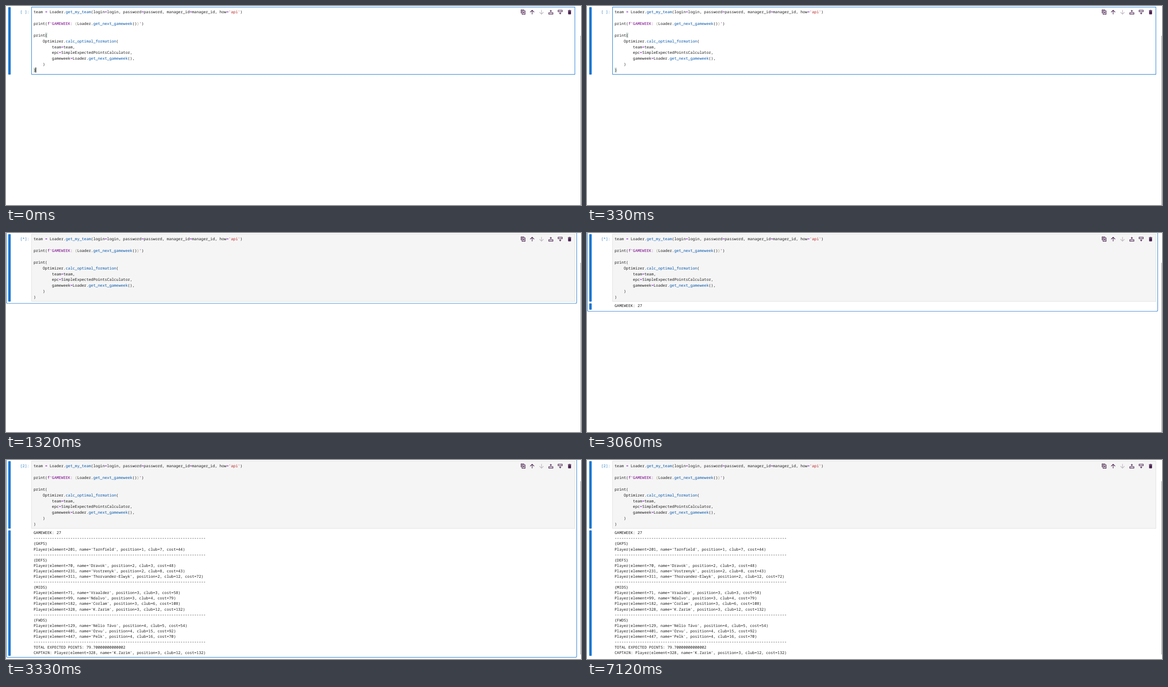
An HTML page for the animation above (8 s loop, 1271 px wide and 441 px high).

```html
<!DOCTYPE html>
<html lang="en">
<head>
<meta charset="utf-8">
<title>Notebook cell run</title>
<style>
  html, body { margin: 0; width: 100%; height: 100%; overflow: hidden; background: #fff; }
  svg { display: block; width: 1271px; height: 441px; }
  text {
    font: 8.462px "Noto Sans Mono", "DejaVu Sans Mono", monospace;
    white-space: pre; text-rendering: geometricPrecision; fill: #1c1c1c;
  }
  .prompt { fill: #307fc1; }
  .method { fill: #0055aa; }
  .operator { fill: #7800c2; }
  .string { fill: #ba2121; }
  .template { fill: #770088; }
  .brace { fill: #999977; }
  .bar { fill: #1976d2; }
  .match { fill: #d0dcd8; }
  .icon { fill: none; stroke: #4a2350; stroke-width: 1.25; }
  .icon .solid { fill: #4a2350; stroke: none; }
  .icon .disabled { stroke: #bdb6bf; }
</style>
</head>
<body>
<svg viewBox="0 0 1271 441">
  <rect class="bar" x="5" y="2.5" width="5.4" height="149.5" rx="1"/>
  <rect id="outputBar" class="bar" x="5" y="156" width="5.4" rx="1"/>
  <rect id="editor" x="56.5" y="2.5" width="1201" height="149"/>
  <rect id="focusRing" x="0.8" y="-6" width="1260.7" rx="2.5" fill="none" stroke="#3f87d6" stroke-width="1.2"/>
  <rect id="scrollThumb" x="1270" width="1" fill="#8c8c8c"/>

  <g id="brackets">
    <rect class="match" x="86.3" y="59" width="5.1" height="11"/>
    <rect class="match" x="61" y="136.5" width="5.1" height="11"/>
  </g>
  <text id="prompt" class="prompt" x="31.3" y="16"></text>
  <g id="code"></g>
  <g id="firstOutput"></g>
  <g id="result"></g>
  <rect id="cursor" x="65.3" y="136.3" width="1.3" height="11.2" fill="#000"/>

  <g class="icon">
    <path d="M1138.6 16V8.7H1145.5M1140.8 10.8H1147.4V18.3H1140.8ZM1144.1 12.5V16.6M1142 14.55H1146.2"/>
    <path d="M1163 18.6V9.5M1158.6 13.7L1163 9.3L1167.4 13.7"/>
    <path class="disabled" d="M1183.7 8.8V18M1179.3 13.8L1183.7 18.2L1188.1 13.8"/>
    <path d="M1199.8 14.9H1208.9V18H1199.8ZM1204.3 8.8V13.2M1202.1 11H1206.5"/>
    <path d="M1220.4 9.4H1229.5V12.5H1220.4ZM1225 14.2V18.6M1222.8 16.4H1227.2"/>
    <path class="solid" d="M1242 9.5H1244L1244.6 8.8H1247L1247.6 9.5H1249.4V10.7H1242ZM1242.5 11.3H1249V17.2Q1249 18.5 1247.8 18.5H1243.7Q1242.5 18.5 1242.5 17.2Z"/>
  </g>
</svg>
<script>
const $ = id => document.getElementById(id);
const LOOP = 8000;

const code = `team = Loader.get_my_team(login=login, password=password, manager_id=manager_id, how='api')

print(f'GAMEWEEK: {Loader.get_next_gameweek()}')

print(
    Optimizer.calc_optimal_formation(
        team=team,
        epc=SimpleExpectedPointsCalculator,
        gameweek=Loader.get_next_gameweek(),
    )
)`.split('\n');

const player = (element, name, position, club, cost) =>
  `Player(element=${element}, name='${name}', position=${position}, club=${club}, cost=${cost})`;
const rule = '-'.repeat(75);
const captain = player(328, 'K.Zarim', 3, 12, 132);
const result = [
  rule, '{GKPS}',
  player(201, 'Tarnfield', 1, 7, 44),
  rule, '{DEFS}',
  player(70, 'Dravok', 2, 3, 48),
  player(231, 'Vostrenyk', 2, 8, 43),
  player(311, 'Thorvander-Elwyk', 2, 12, 72),
  rule, '{MIDS}',
  player(71, 'Vraalder', 3, 3, 58),
  player(99, 'Ndalvo', 3, 4, 79),
  player(182, 'Corlam', 3, 6, 108),
  captain,
  rule, '{FWDS}',
  player(129, 'Nélio Távo', 4, 5, 54),
  player(401, 'Orvu', 4, 15, 92),
  player(447, 'Pelk', 4, 16, 70),
  rule,
  'TOTAL EXPECTED POINTS: 79.70000000000002',
  'CAPTAIN: ' + captain
];

function tokenClass(token) {
  if (token === '=') return 'operator';
  if (token === "'api'") return 'string';
  if (/[{}]/.test(token)) return 'brace';
  return token.includes("'") ? 'template' : 'method';
}

const highlight = line => line.replace(
  /(get|calc)_\w+|=|'api'|f'GAMEWEEK: |'(?=\)$)|[{}]/g,
  token => `<tspan class="${tokenClass(token)}">${token}</tspan>`);

function writeLines(id, lines, top, pitch) {
  $(id).innerHTML = lines.map((line, i) =>
    `<text x="61" y="${(top + i * pitch).toFixed(2)}">${line}</text>`).join('');
}

writeLines('code', code.map(highlight), 16, 12.92);
writeLines('firstOutput', ['GAMEWEEK: 27'], 164.3, 12.09);
writeLines('result', result, 176.4, 12.09);

function set(id, attributes) {
  for (const name in attributes) $(id).setAttribute(name, attributes[name]);
}
const show = (id, visible) => set(id, { visibility: visible ? 'visible' : 'hidden' });

function render(t) {
  const running = t >= 1320, printing = t >= 3060, scrolled = t >= 3130, done = t >= 3330;

  show('cursor', !running && (t < 330 || t >= 920));
  show('brackets', !running);
  set('editor', running ? { fill: '#f5f5f5', stroke: '#e0e0e0' } : { fill: '#fff', stroke: '#1976d2' });
  $('prompt').textContent = done ? '[2]:' : running ? '[*]:' : '[ ]:';

  show('firstOutput', printing);
  show('result', done);
  show('outputBar', printing);
  set('outputBar', { height: done ? 278 : 14 });

  show('focusRing', running && t < 7120);
  const ringBottom = done ? 437.3 : printing ? 173.5 : 156;
  set('focusRing', { height: ringBottom + 6 });

  const thumbTop = done ? 47 : scrolled ? 64 : 66;
  set('scrollThumb', { y: thumbTop, height: (done ? 431 : 441) - thumbTop });
}

function tick() {
  render(performance.now() % LOOP);
  requestAnimationFrame(tick);
}
tick();
</script>
</body>
</html>
```
